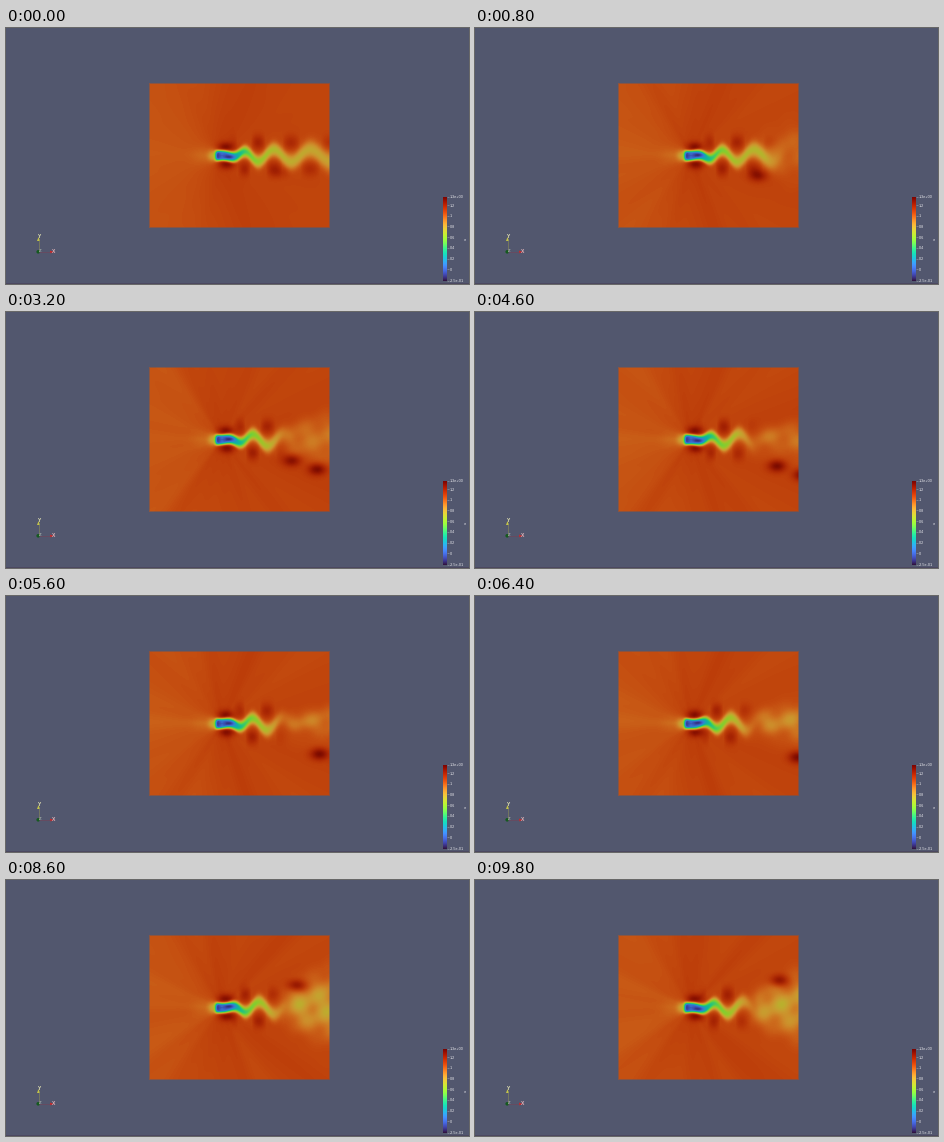
A matplotlib script for the animation above (10000 ms loop, 463x256 px).

```python
import numpy as np
import matplotlib.pyplot as plt
from matplotlib.animation import FuncAnimation
from matplotlib.patches import Polygon, Rectangle, Circle

W, H, DPI = 463, 256, 100
FRAMES, STEP = 50, 200
LEFT, RIGHT, TOP, BOTTOM = 143, 324, 55, 200
V_MIN, V_MAX = -0.22, 1.35
SHADE = 0.81
RATE = 0.082   # vortex pairs shed per frame
DRIFT = 2.3    # pixels per frame
AXIS = 127.7   # height of the wake's centre line

# Fast eddies thrown out of the wake: birth frame, side (+1 is below)
EDDIES = [(-2, 1), (9, 1), (34, -1)]

X, Y = np.meshgrid(np.arange(LEFT, RIGHT) + 0.5, np.arange(TOP, BOTTOM) + 0.5)
R = np.hypot(X - 216, Y - AXIS)
THETA = np.arctan2(Y - AXIS, X - 216)
rng = np.random.default_rng(4)
WAVES = [(n, rng.uniform(0, 2 * np.pi), rng.uniform(-0.25, 0.25))
         for n in (3, 5, 8, 11, 15, 21)]


def bump(x, y, sx, sy):
    return np.exp(-((X - x) / sx) ** 2 - ((Y - y) / sy) ** 2)


def sigmoid(z):
    return 1 / (1 + np.exp(-np.clip(z, -40, 40)))


# Parts that do not depend on time
WAVE_POS = np.log(np.maximum(1 + 0.2 * (X - 238) / 27, 0.2)) / 0.2
SWING = 6 * sigmoid((X - 234) / 6)
WIDTH = 5.2 + 0.05 * np.maximum(X - 235, 0)
SHARPNESS = 2 + 2 * sigmoid((229 - X) / 4)
DEFICIT = 0.24 + 0.9 / (1 + (np.maximum(X - 208, 0) / 28) ** 2.6)
ONSET = sigmoid((X - 209.7) / 0.9)
STREAM = (1.0 + 0.05 * np.sin(THETA) ** 2 * np.exp(-R / 90)
          + 0.045 * sigmoid((X - 212) / 12)
          - 0.2 * bump(207, AXIS, 5, 5.5) - 0.05 * bump(198, AXIS, 12, 8)
          + 0.2 * bump(220, 119, 8, 5) + 0.2 * bump(221, 136, 8, 5))


def rays(frame):
    total = sum(np.cos(n * THETA + p + s * frame) / np.sqrt(n) for n, p, s in WAVES)
    return min(0.2 + frame / 10, 0.8) * 0.02 * total * (1 - np.exp(-R / 35))


def plume(frame):
    """Broad slow cloud far downstream; it breathes and thickens with time."""
    strength = min(frame / 6, 1) * (0.13 + 0.15 * sigmoid((frame - 31) / 3))
    height = 21 + 8 * np.cos(2 * np.pi * (frame - 8) / 37)
    spread = height * (0.6 + 0.4 * np.clip((X - 280) / 40, 0, 1))
    travel = X - DRIFT * frame
    lumps = 0.85 + 0.3 * np.sin(0.2 * travel + 0.08 * Y) * np.cos(0.17 * Y - 0.06 * travel)
    return strength * lumps * sigmoid((X - 281) / 4) * np.exp(-((Y - 126) / spread) ** 2)


def eddies(frame):
    total = 0
    for birth, side in EDDIES:
        age = frame - birth
        if age > 0:
            x = 270 + DRIFT * age
            y = AXIS + side * (15 + 0.35 * (x - 270))
            total = total + 0.24 * min(age / 8, 1) * bump(x, y, 9, 6)
    return total


def field(frame):
    cycles = RATE * frame
    crest = np.cos(2 * np.pi * (WAVE_POS - cycles))
    reach = 272 + 75 * np.exp(-frame / 4)
    regular = sigmoid((reach - X) / 5)
    ribbon = DEFICIT * np.exp(-np.abs((Y - AXIS + SWING * crest) / WIDTH) ** SHARPNESS)

    v = STREAM + rays(frame) - plume(frame) + eddies(frame)
    # Fast pockets sit in the bends of the ribbon
    pocket = 0.15 * regular * sigmoid((X - 232) / 4) * np.exp(-(X - 232) / 130)
    for side in (-1, 1):
        bend = np.maximum(side * crest, 0)
        v += pocket * bend * np.exp(-((Y - AXIS - 13 * side) / 7.5) ** 2)
    v -= np.minimum(ribbon * ONSET * regular, 1.04)
    v -= 0.2 * bump(224, AXIS + 1.4 * np.cos(2 * np.pi * cycles), 5, 2.2)
    return v


# Soft outline of the plotted rectangle
EDGE = np.full(X.shape, 0.5)
EDGE[1:-1, 1:-1] = 1


def paint(frame):
    level = np.clip((field(frame) - V_MIN) / (V_MAX - V_MIN), 0, 1)
    return np.dstack([plt.cm.turbo(level)[..., :3] * SHADE, EDGE])


fig = plt.figure(figsize=(W / DPI, H / DPI), dpi=DPI, facecolor="#52576e")
ax = fig.add_axes([0, 0, 1, 1])
ax.axis("off")


def label(x, y, text, px, color="#e6e6ea", **kw):
    ax.text(x, y, text, fontsize=px * 72 / DPI, color=color,
            family="Liberation Sans", va="center_baseline", **kw)


def line(x, y, color, px):
    ax.plot(x, y, color=color, lw=px * 72 / DPI, solid_capstyle="butt")


def shape(patch):
    patch.set_linewidth(0)
    ax.add_patch(patch)


image = ax.imshow(paint(0), extent=(LEFT, RIGHT, BOTTOM, TOP),
                  interpolation="nearest", aspect="auto")

# Colour legend
ramp = plt.cm.turbo(np.linspace(1, 0, 256))[:, None, :3]
ax.imshow(ramp, extent=(437, 441, 253, 169), aspect="auto")
marks = [(f"{v:g}", 253 - 84 * (v - V_MIN) / (V_MAX - V_MIN))
         for v in np.arange(7) / 5]
for text, y in marks + [("1.3e+00", 169), ("-2.5e-01", 253)]:
    line([441, 442.6], [y, y], "#9a9ca8", 0.6)
    label(443.7, y, text, 3.8)
label(460, 211, "u", 3.8, rotation=90, ha="center")

# Orientation axes
line([32.5, 32.5], [223, 212], "#777a60", 0.9)
line([33, 44], [224, 224], "#684a60", 0.9)
shape(Polygon([(32.5, 209), (31, 213), (34, 213)], color="#c4c448"))
shape(Polygon([(48, 224), (44, 222.6), (44, 225.4)], color="#c82828"))
shape(Circle((32.2, 223.8), 1.8, color="#155a20"))
label(33.5, 208.5, "Y", 5, "#e4e4b4", ha="center", weight="bold")
label(48, 222.8, "X", 5, "#e0b4ba", ha="center", weight="bold")
label(34.5, 222.3, "Z", 4.2, "#c5d5c5", ha="center")

shape(Rectangle((0, 254.6), W, 1.4, color="#4c4860"))
ax.set_xlim(0, W)
ax.set_ylim(H, 0)


def update(frame):
    image.set_data(paint(frame))
    return [image]


anim = FuncAnimation(fig, update, frames=FRAMES, interval=STEP,
                     repeat=True, repeat_delay=0, blit=False)
plt.show()
```
